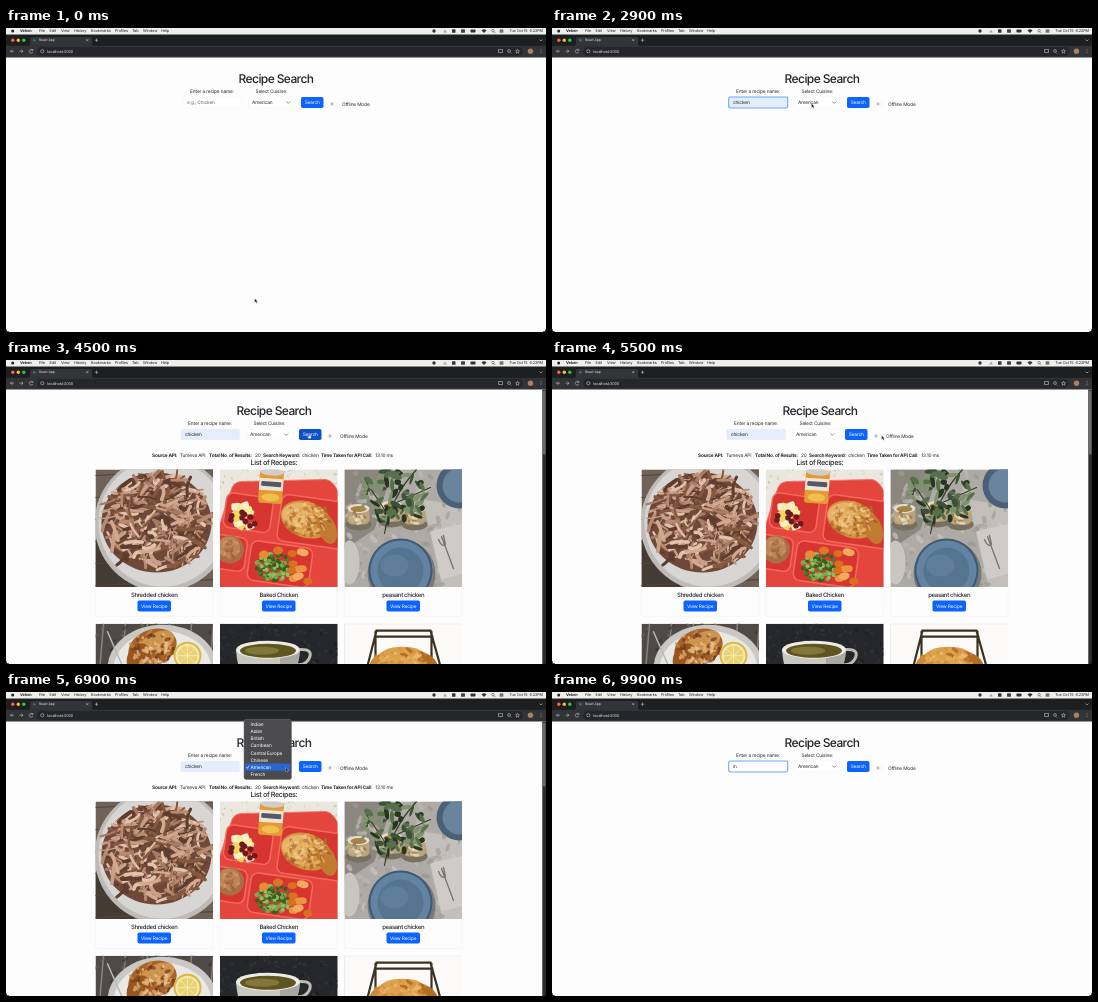
These frames come from a looping animation (540x304 px, 10000 ms). An HTML page:

```html
<!DOCTYPE html>
<html lang="en">
<head>
<meta charset="utf-8">
<title>Recipe Search</title>
<style>
html, body { margin: 0; width: 100%; height: 100%; overflow: hidden; background: #fdfdfd; }
svg { display: block; }
text { font: 4.8px Inter, "Open Sans", sans-serif; letter-spacing: -.03em; fill: #212529;
  text-rendering: geometricPrecision; white-space: pre; }
.mid { text-anchor: middle; }
.h1 { font-size: 12px; font-weight: 500; letter-spacing: -.05em; }
.h4 { font-size: 7.2px; font-weight: 500; letter-spacing: -.05em; }
.h5 { font-size: 6px; font-weight: 500; letter-spacing: -.055em; }
.b { font-weight: 700; letter-spacing: -.04em; }
.w { fill: #fff; }
.menu { font-size: 3.9px; }
.url { font-size: 3.9px; fill: #e4e5e7; }
.tab { font-size: 3.4px; fill: #e4e5e7; }
.ico { fill: none; stroke: #c4c6ca; stroke-width: .6; }
</style>
</head>
<body>
<svg id="stage" width="540" height="304" viewBox="0 0 540 304"></svg>
<script>
const stage = document.getElementById('stage');
let seed = 7;
const rnd = (a = 1, b = 0) => {
  seed = (seed * 16807) % 2147483647;
  return b + (a - b) * seed / 2147483647;
};
const pick = list => list[Math.floor(rnd(list.length))];
const many = (n, f) => Array.from({ length: n }, (_, i) => f(i)).join('');
const rect = (x, y, w, h, fill, r = 0, more = '') =>
  `<rect x="${x}" y="${y}" width="${w}" height="${h}" rx="${r}" fill="${fill}" ${more}/>`;
const oval = (x, y, rx, ry, fill, more = '') =>
  `<ellipse cx="${x}" cy="${y}" rx="${rx}" ry="${ry}" fill="${fill}" ${more}/>`;
const dot = (x, y, r, fill, more) => oval(x, y, r, r, fill, more);
const path = (d, fill, more = '') => `<path d="${d}" fill="${fill}" ${more}/>`;
const line = (d, color, w, more = '') =>
  path(d, 'none', `stroke="${color}" stroke-width="${w}" stroke-linecap="round" ${more}`);
const text = (x, y, s, cls = '', more = '') => `<text x="${x}" y="${y}" class="${cls}" ${more}>${s}</text>`;
const group = (id, body) => `<g id="${id}">${body}</g>`;
const turn = (a, x, y) => `transform="rotate(${a} ${x} ${y})"`;
const icon = d => `<path class="ico" d="${d}"/>`;

// Calls f(x, y) for n random places inside an ellipse
const scatter = (n, x, y, rx, ry, f) => many(n, () => {
  const a = rnd(6.283), d = Math.sqrt(rnd());
  return f(x + rx * d * Math.cos(a), y + ry * d * Math.sin(a));
});
const mottle = (n, x, y, rx, ry, size, tones) => scatter(n, x, y, rx, ry, (px, py) =>
  oval(px, py, rnd(size, size / 3), rnd(size / 2, size / 4), pick(tones), turn(rnd(180), px, py) + ' opacity=".65"'));

// Photos, each drawn in a square of side 117.5
function shredded() {
  const tones = ['#b88a70', '#d3aa91', '#a87b64', '#e2c2ad', '#84593f', '#c99f88', '#5e3c2e'];
  return rect(0, 0, 118, 118, '#6f6257') + path('M0 70L40 118H0Z', '#443b33') +
    many(6, i => line(`M0 ${i * 22 + 6}L118 ${i * 22}`, '#4f453c', 1.2)) +
    dot(67, 54, 68, '#bdbab8') + dot(67, 53, 64, '#d8d6d4') + oval(61, 53, 55, 50, '#6e4839') +
    scatter(300, 61, 52, 53, 48, (x, y) => {
      const s = rnd(3.4, -.6), l = rnd(10, 3), dx = l * Math.cos(s), dy = l * Math.sin(s);
      return line(`M${x - dx} ${y - dy}q${dx + rnd(4, -4)} ${dy + rnd(4, -4)} ${2 * dx} ${2 * dy}`,
        pick(tones), rnd(4, .8));
    });
}

function tray() {
  const bay = (x, y, w, h) => rect(x, y, w, h, '#d6362f', 7, 'stroke="#f4695f" stroke-width="1.5"');
  const fruit = (x, y) => rect(x - 4, y - 3, rnd(10, 7), rnd(8, 5), pick(['#f3d75c', '#f9ec9d', '#f7f0cf']), 2,
    turn(rnd(60, -30), x, y));
  return rect(0, 0, 118, 118, '#e9e7de') + mottle(90, 59, 12, 62, 20, 2, ['#b9c0b0', '#f8f7f1', '#d9c9a0']) +
    path('M-4 66L12 18Q15 12 22 12L106 10Q113 11 118 22V118H-4Z', '#e4453c', 'stroke="#f0766b"') +
    `<g ${turn(8, 58, 58)}>` + bay(3, 30, 47, 35) + bay(58, 24, 66, 47) +
    bay(-8, 73, 38, 34) + bay(34, 74, 62, 40) + '</g>' +
    `<g ${turn(4, 51, 18)}>` + rect(39, 1, 24, 33, '#e59a38', 3) + rect(39, 9, 24, 12, '#f1e6cf') +
    rect(41, 12, 20, 5, '#54586a', 1) + oval(51, 2.5, 12, 3.5, '#cfcec8') +
    oval(51, 28, 9, 4, '#f0bf4c') + '</g>' +
    scatter(20, 23, 47, 15, 13, fruit) + scatter(9, 24, 45, 18, 13, (x, y) => dot(x, y, 2.8, '#6e1a22')) +
    oval(86, 50, 26, 18, '#d2913f', turn(20, 86, 50)) + oval(79, 45, 17, 12, '#e6b468') +
    oval(107, 59, 9, 16, '#c17a31', turn(-20, 107, 59)) +
    mottle(110, 87, 50, 23, 16, 4, ['#f1cd8d', '#b46d28', '#dfa04a', '#e9bc72', '#9d5a22']) +
    dot(10, 80, 14, '#a86f45') + dot(9, 78, 11, '#bd8458') + mottle(25, 10, 79, 10, 10, 3, ['#d0a074', '#9a6238']) +
    scatter(120, 54, 97, 18, 14, (x, y) => dot(x, y, 2, pick(['#4d7c2e', '#78a84a', '#37601f', '#92bd62']))) +
    many(12, () => oval(rnd(88, 70), rnd(112, 82), 4.5, 3.4, pick(['#ee9440', '#d9701f', '#f2ab5e']))) +
    oval(44, 85, 5, 4, '#ea8a35') + oval(58, 81, 5, 4, '#dd7428');
}

function table() {
  const cup = (x, y) => oval(x, y + 9, 13, 6, '#77705f') + rect(x - 11, y - 8, 22, 17, '#b9a27c', 5) +
    oval(x, y - 7, 11, 4.5, '#e9dfc8') + oval(x, y - 6.5, 8, 3, '#a98344') +
    mottle(14, x, y + 2, 9, 7, 4, ['#efe3c4', '#8d7448', '#d3b880']);
  const leaf = (x, y) => oval(x, y, rnd(7, 3), rnd(3, 1.2), pick(['#3c5236', '#586f4c', '#27371f', '#7e9270']),
    turn(rnd(180), x, y));
  return rect(0, 0, 118, 118, '#aeaba6') + path('M0 0H48L30 60 0 80Z', '#8b877f') +
    path('M78 30L118 36V118H98Z', '#c3c0bb') +
    mottle(180, 59, 59, 75, 75, 5, ['#bfbcb6', '#a19d96', '#cdcac5', '#98948d']) +
    path('M86 62L118 54V104L97 110Z', '#cfccc7') +
    dot(115, 16, 23, '#4a6079') + dot(115, 16, 17, '#6b849d') + oval(5, 93, 10, 22, '#c9c6c0') +
    cup(14, 46) + cup(70, 46) + cup(47, 43) +
    line('M40 64Q46 28 72 0M44 46L20 10M52 33L86 18', '#393a28', 1.2) +
    scatter(75, 50, 27, 34, 27, leaf) +
    dot(57, 104, 34, '#77797a') + dot(56, 101, 32, '#3f5973') + dot(56, 101, 30, '#6283a2') +
    dot(56, 101, 23, '#55748f') + oval(50, 96, 14, 11, '#5f7e9a') +
    line('M97 67L109 99M94 70Q97 78 101 75L99 66', '#77746e', 1.3);
}

function lemon() {
  return rect(0, 0, 118, 60, '#4f4a47') + many(6, i => line(`M${i * 22 + 8} 0l-5 60`, '#8a837c', 1.5)) +
    mottle(70, 59, 20, 65, 30, 4, ['#6f6964', '#3b3735', '#5e5853']) +
    oval(67, 45, 55, 44, '#c9c8c4') + oval(67, 46, 49, 39, '#e9e8e4') +
    oval(57, 24, 25, 18, '#a8632a', turn(-22, 57, 24)) + oval(61, 19, 19, 10, '#cf9350', turn(-25, 61, 19)) +
    oval(43, 34, 11, 15, '#98551f', turn(25, 43, 34)) +
    mottle(80, 56, 25, 22, 17, 4, ['#e5b778', '#7a4219', '#c9873e', '#f0d3a0', '#5f3415']) +
    dot(92, 32, 14, '#d9b745') + dot(92, 32, 12, '#f3e7b0') + dot(92, 32, 10, '#e9d274') +
    many(8, i => line(`M92 32L${92 + 10 * Math.cos(i * .785)} ${32 + 10 * Math.sin(i * .785)}`, '#f8edb6', .8)) +
    line('M12 8L26 40', '#bab8b4', 1.5);
}

function broth() {
  return rect(0, 0, 118, 60, '#26272a') + mottle(90, 59, 25, 65, 30, 3, ['#323337', '#1b1c1f', '#3a3a3d']) +
    line('M79 26Q94 25 89 35Q85 42 77 41', '#bdbbb2', 3) +
    path('M16 26Q18 58 35 60H60Q78 55 80 26Z', '#c9c8c0') + path('M60 30L80 26Q78 55 60 60Z', '#a9a8a1') +
    oval(48, 26, 32, 9, '#ecebe4') + oval(48, 27, 28, 7, '#5e5520') + oval(42, 27, 17, 4, '#82763a');
}

function roast() {
  return rect(0, 0, 118, 60, '#fbfaf8', 0, 'stroke="#ddd"') +
    line('M21 50L32 7H86L98 50M31 13H88M31 8V43M87 8V43', '#3a3324', 2.2) +
    oval(59, 43, 34, 18, '#c17a2a') + oval(58, 35, 25, 12, '#dda04b') +
    oval(34, 42, 8, 12, '#cb8836', turn(25, 34, 42)) + oval(84, 42, 8, 12, '#b36c24', turn(-25, 84, 42)) +
    mottle(90, 59, 40, 30, 15, 4, ['#efc27a', '#a35c1c', '#d48d36', '#e4ad58']);
}

const photo = (x, y, body) => `<svg x="${x}" y="${y}" width="117.5" height="117.5">${body}</svg>`;
const card = (x, name, pic) => rect(x, 109.5, 117.5, 147, '#fdfdfd', 1.5, 'stroke="#ececed" stroke-width=".4"') +
  photo(x, 109.5, pic) + text(x + 58.7, 237, name, 'h5 mid') +
  rect(x + 42, 240.5, 33.5, 11, '#0d63fd', 1.8) + text(x + 58.7, 247.7, 'View Recipe', 'mid w');

const menuItems = { File: 33, Edit: 43.5, View: 55, History: 68, Bookmarks: 85, Profiles: 109, Tab: 126, Window: 137, Help: 155 };
const browser = rect(0, 0, 540, 6.5, '#efeeea') + dot(6.7, 3, 1.5, '#222') +
  text(14, 4.4, 'Velorn', 'menu b') +
  Object.entries(menuItems).map(([s, x]) => text(x, 4.4, s, 'menu')).join('') +
  dot(428, 3, 1.7, '#333') + path('M437 4.5l2-3 2 3z', '#aaa') + rect(446, 1.3, 3.5, 3.5, '#333', .6) +
  rect(455, 1.3, 4, 3.4, '#444', .4) + rect(464.5, 1.6, 5, 2.8, '#333', .7) +
  path('M475.5 2.4Q478 .2 480.5 2.4L478 5Z', '#333') +
  `<g transform="translate(487 2.7)">${dot(0, 0, 1.3, 'none', 'stroke="#333" stroke-width=".5"')}${line('M1 1l1.2 1.2', '#333', .5)}</g>` +
  rect(493.5, 1.4, 4, 1.3, '#444', .6) + rect(493.5, 3.3, 4, 1.3, '#444', .6) +
  text(537, 4.4, '', 'menu', 'id="clock" text-anchor="end"') +
  rect(0, 6.5, 540, 11.5, '#1d1e20') +
  ['#ff5f57', '#febc2e', '#28c840'].map((c, i) => dot(6.8 + i * 5.5, 12.2, 1.7, c)).join('') +
  path('M22 18Q24 18 24 15V11Q24 9 26 9H84Q86 9 86 11V15Q86 18 88 18Z', '#343538') +
  dot(28.3, 12.2, 1.3, '#397783') + text(33, 13.4, 'React App', 'tab') +
  icon('M80.3 11.2l2 2m0-2l-2 2M90.5 10.5v3.4m-1.7-1.7h3.4M533.5 11.5l1.5 1.5 1.5-1.5') +
  rect(0, 17.8, 540, 11.7, '#323336') + rect(31, 19, 486, 9, '#252629', 4.5) +
  icon('M8 23.2H4.5m1.6-1.6l-1.6 1.6 1.6 1.6M13.5 23.2H17m-1.6-1.6l1.6 1.6-1.6 1.6M26.6 22.2a1.8 1.8 0 1 0 .2 1.8M26.8 21v1.4h-1.4') +
  dot(36.3, 23.2, 1.6, 'none', 'class="ico"') + text(41.3, 24.7, 'localhost:3000', 'url') +
  icon('M492.5 21.5h4v3h-4zM504.3 24.5l1 1M511.5 21.3l.6 1.3 1.4.2-1 1 .2 1.4-1.2-.7-1.2.7.2-1.4-1-1 1.4-.2z') +
  dot(503, 23, 1.4, 'none', 'class="ico"') +
  dot(524.5, 23.2, 2.7, '#ad8060') + many(3, i => dot(535, 21.5 + i * 1.6, .45, '#c4c6ca'));

const form = text(270, 55, 'Recipe Search', 'h1 mid') +
  text(206, 64.7, 'Enter a recipe name:', 'mid') + text(265.3, 64.7, 'Select Cuisine:', 'mid') +
  rect(176.7, 69, 59, 11, '#fff', 1.7, 'id="field"') +
  rect(180, 71.5, 18, 6, '#b3d4fd', 0, 'id="mark"') + text(181, 76.2, '', '', 'id="entry"') +
  rect(242.7, 69, 46.3, 11, '#fff', 1.7, 'id="select"') + text(246, 76.2, 'American') +
  line('M280.7 73.8l1.6 1.6 1.6-1.6', '#444', .6) +
  rect(295, 69, 22.5, 11, '#0d63fd', 1.8, 'id="search"') + text(306.2, 76.2, 'Search', 'mid w') +
  rect(323.3, 74, 7.5, 4, '#fafafa', 2, 'stroke="#ececec" stroke-width=".4"') + dot(326, 76, 1.4, '#b6b7b9') +
  text(336, 77.7, 'Offline Mode');

const results = text(146, 96.6, 'Source API:', 'b') + text(174, 96.6, 'Tumeva API') +
  text(203, 96.6, 'Total No. of Results:', 'b') + text(249, 96.6, '20') +
  text(257, 96.6, 'Search Keyword:', 'b') + text(296, 96.6, 'chicken') +
  text(315, 96.6, 'Time Taken for API Call:', 'b') + text(387, 96.6, '13.10 ms', '', 'text-anchor="end"') +
  text(268, 105.3, 'List of Recipes:', 'h4 mid') +
  card(89.5, 'Shredded chicken', shredded()) + card(214, 'Baked Chicken', tray()) +
  card(338.5, 'peasant chicken', table()) +
  photo(89.5, 263.7, lemon()) + photo(214, 263.7, broth()) + photo(338.5, 263.7, roast()) +
  rect(536.3, 29.5, 4, 275, '#2c2c2c') + rect(537, 30.5, 2.6, 64, '#6b6b6b', 1.3);

const cuisines = ['Indian', 'Asian', 'British', 'Carribean', 'Central Europe', 'Chinese', 'American', 'French'];
const list = rect(238, 27.3, 47.5, 60.2, '#4b4b4e', 2.2, 'stroke="#707073" stroke-width=".5"') +
  rect(239.2, 71.6, 45, 7.2, '#2867d3', 1) + line('M240.4 75.3l.9 1.1 1.5-2.4', '#fff', .6) +
  cuisines.map((s, i) => text(244.5, 34.1 + i * 7.12, s, 'w')).join('');

stage.innerHTML = rect(0, 0, 540, 304, '#fdfdfd') + group('results', results) + group('form', form) +
  browser + group('list', list) +
  path('M0 304V301Q0 304 3 304ZM540 304V301Q540 304 537 304Z', '#222', 'stroke="#222" stroke-width=".6"') +
  group('pointer', group('arrow', path('M0 0V4.2L1 3.3 1.7 4.8 2.5 4.4 1.8 3H3.1Z', '#111', 'stroke="#fff" stroke-width=".3"')) +
    group('beam', line('M-.9-2.5Q0-2.5 0-1.8Q0-2.5.9-2.5M0-1.8V1.8M-.9 2.5Q0 2.5 0 1.8Q0 2.5.9 2.5', '#222', .5)) +
    group('hand', path('M-.5 0Q0-.6.5 0V1.6L2.2 2Q2.6 3.6 1.8 4.7H-.5L-1.7 2.7Q-1.3 2-.5 2.7Z', '#fff', 'stroke="#222" stroke-width=".35"')));

const $ = id => document.getElementById(id);
const show = (id, on) => $(id).setAttribute('display', on ? 'inline' : 'none');
const set = (id, attrs) => { for (const k in attrs) $(id).setAttribute(k, attrs[k]); };
const within = (t, a, b) => t >= a && t < b;
const border = on => ({ stroke: on ? '#6ba7f9' : '#eff0f1', 'stroke-width': on ? 1.1 : .5 });

// Pointer stops: time, x, y
const stops = [[0, 248.7, 270.5], [300, 248.7, 270.5], [1000, 212, 76], [2500, 212, 76], [2900, 259.5, 75.5],
  [3300, 303, 74], [4700, 303, 74], [5400, 329.7, 75.5], [5800, 329.7, 75.5], [6400, 268, 75],
  [6600, 268, 75], [6900, 279.5, 75.5], [7400, 279.5, 75.5], [7900, 215, 77], [10000, 215, 77]];
function place(t) {
  const i = stops.findIndex(s => s[0] > t), [t0, x0, y0] = stops[i - 1], [t1, x1, y1] = stops[i];
  const u = (t - t0) / (t1 - t0), e = u * u * (3 - 2 * u);
  return [x0 + (x1 - x0) * e, y0 + (y1 - y0) * e];
}

function draw(t) {
  const found = within(t, 3600, 8800), [x, y] = place(t), shift = found ? -2 : 0;
  const typed = t < 8800 ? 'chicken'.slice(0, Math.max(0, Math.floor((t - 1200) / 130)))
    : 'in'.slice(0, Math.max(0, Math.floor((t - 9500) / 200)));
  const focus = within(t, 1100, 3400) || within(t, 8200, 8800) || t >= 9200;
  const picked = within(t, 7400, 8200), open = within(t, 6500, 7400);
  const overField = Math.abs(x - 206 - shift) < 29 && Math.abs(y - 74.5) < 5.5;
  const overButton = Math.abs(x - 306 - shift) < 11 && Math.abs(y - 74.5) < 5.5;
  show('results', found);
  show('list', open);
  set('form', { transform: `translate(${shift} 0)` });
  set('field', { fill: within(t, 2400, 8800) ? '#e4edfc' : '#fff', ...border(focus) });
  set('select', border(picked));
  set('search', { fill: overButton ? '#0b50cf' : '#0d63fd' });
  show('mark', within(t, 8300, 8800));
  $('entry').textContent = typed || 'e.g., Chicken';
  $('entry').style.fill = typed ? '#212529' : '#62676c';
  $('clock').textContent = `Tue Oct 15  6:2${t < 8800 ? 2 : 3}PM`;
  show('pointer', !within(t, 1300, 2400) && t < 9600);
  set('pointer', { transform: `translate(${x} ${y})` });
  show('beam', overField);
  show('hand', overButton);
  show('arrow', !overField && !overButton);
}

const start = performance.now();
function tick() {
  draw(Math.floor((performance.now() - start) / 100) * 100 % 10000);
  requestAnimationFrame(tick);
}
tick();
</script>
</body>
</html>
```
